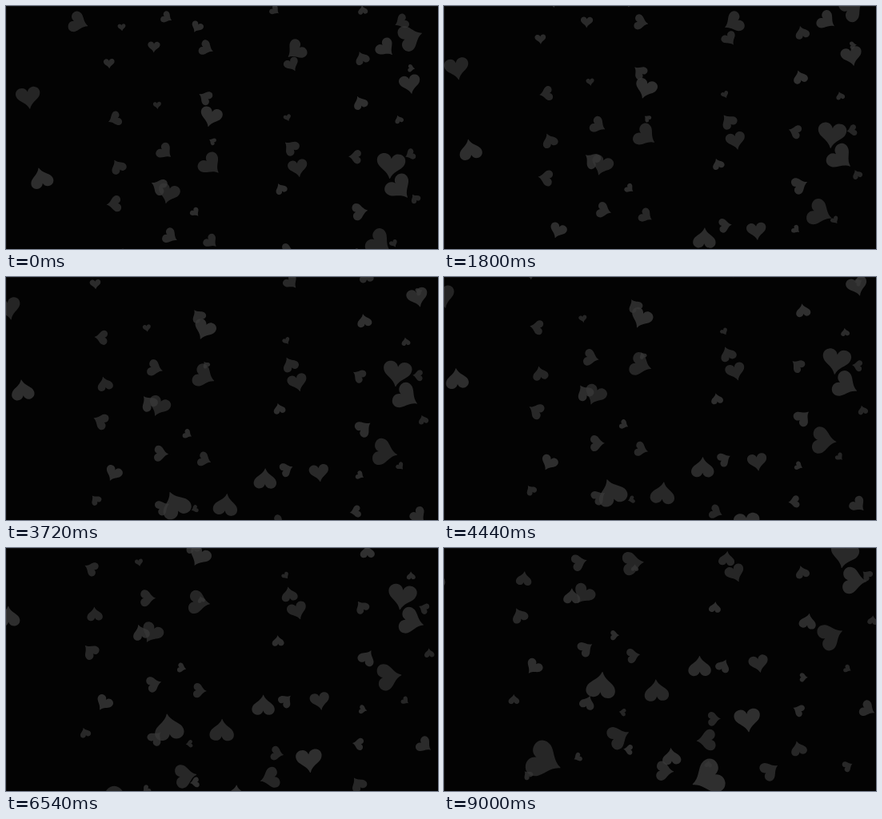
Animation, 540 px wide and 304 px high, one loop 9.06 s. Source, as an HTML page with a canvas:

```html
<!DOCTYPE html>
<html lang="en">
<head>
<meta charset="utf-8">
<title>Rising hearts</title>
<style>
  html, body { margin: 0; width: 100%; height: 100%; overflow: hidden; background: #030303; }
  canvas { display: block; width: 100vw; height: 100vh; }
</style>
</head>
<body>
<canvas id="stage" width="540" height="304"></canvas>
<script>
const WIDTH = 540, HEIGHT = 304, LOOP = 9060, STEP = 60;
const VANISH_X = 370;
const ctx = document.getElementById("stage").getContext("2d");

// Unit heart, tip down, one unit wide.
const shape = new Path2D(
  "M0-.25C.05-.41.19-.46.32-.43C.5-.38.56-.2.46-.03C.36.13.1.2.01.46" +
  "L-.01.46C-.1.2-.36.13-.46-.03C-.56-.2-.5-.38-.32-.43C-.19-.46-.05-.41 0-.25Z");

let seed = 29;
function random() {
  seed = (seed * 16807) % 2147483647;
  return seed / 2147483647;
}
const between = (low, high) => low + (high - low) * random();

// Nearer hearts climb faster; all of them fan out from one vertical line.
function makeHeart(x, y, size, angle) {
  return {
    x, y, size, angle,
    rise: 14.2 + .2 * size,
    drift: (x - VANISH_X) / 52,
    spin: 8 * Math.sin(angle * Math.PI / 180),
    alpha: between(.66, .86)
  };
}

// Near hearts: x, y, size, angle at the start of the loop.
const near = [
  [28, 115, 30, -8], [44, 215, 28, 165], [256, 139, 27, 15], [481, 200, 35, 5],
  [492, 228, 33, -40], [506, 39, 32, -110], [362, 56, 26, 50], [475, 53, 24, -45],
  [505, 98, 26, -10], [91, 21, 26, -70], [203, 235, 27, 15], [256, 199, 29, -45],
  [365, 203, 24, -10], [467, 297, 33, -55], [327, 326, 28, 182], [390, 316, 24, -5],
  [222, 364, 36, 135], [281, 360, 30, 195], [241, 416, 29, -55], [378, 401, 32, -3],
  [334, 415, 26, 40], [297, 430, 23, 200], [162, 477, 46, -30], [335, 493, 43, 30],
  [290, 450, 24, -40], [402, 449, 24, -60]
].map(values => makeHeart(...values));

// Far hearts: loose columns of small ones, the lowest still below the stage.
const far = [];
for (const column of [140, 195, 245, 347, 440, 498]) {
  for (let row = 0; row < 8; row++) {
    const x = column + between(-14, 14);
    const y = 10 + row * 58 + between(-18, 18);
    far.push(makeHeart(x, y, between(9, 21), between(-100, 180)));
  }
}
const hearts = [...far, ...near];

function drawHeart({ x, y, size, angle, rise, drift, spin, alpha }, seconds) {
  ctx.save();
  ctx.globalAlpha = alpha;
  ctx.translate(x + drift * seconds, y - rise * seconds);
  ctx.rotate((angle + spin * seconds) * Math.PI / 180);
  ctx.scale(size, size);
  ctx.fill(shape);
  ctx.restore();
}

function draw(seconds) {
  ctx.fillStyle = "#030303";
  ctx.fillRect(0, 0, WIDTH, HEIGHT);
  ctx.fillStyle = "#383838";
  hearts.forEach(heart => drawHeart(heart, seconds));
  ctx.fillStyle = "rgba(255, 255, 255, .06)";
  ctx.fillRect(0, 0, WIDTH, 1);
  ctx.fillRect(0, 1, 1, HEIGHT);
}

const start = performance.now();
function tick() {
  const elapsed = (performance.now() - start) % LOOP;
  draw(Math.floor(elapsed / STEP) * STEP / 1000);
  requestAnimationFrame(tick);
}
tick();
</script>
</body>
</html>
```
